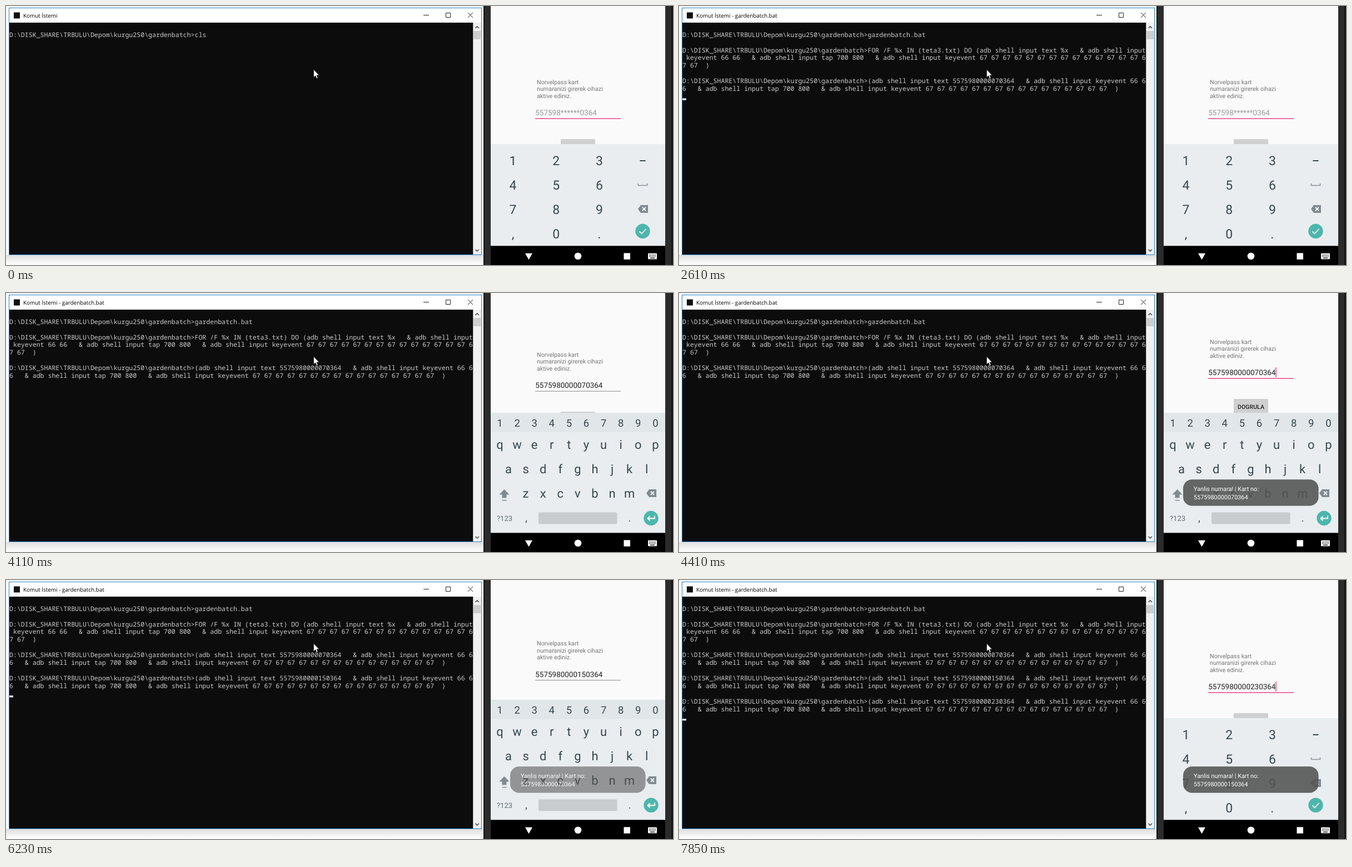
Recreate the animation shown at these times as an HTML page. Size 1200 by 467 pixels, loop 8000 ms.

```html
<!DOCTYPE html>
<html lang="tr">
<head>
<meta charset="utf-8">
<title>Komut</title>
<style>
  html, body { margin: 0; width: 100%; height: 100%; overflow: hidden; background: #fafafa; }
  svg { display: block; width: 100%; height: 100%; }
  text { font-family: Roboto, sans-serif; text-rendering: geometricPrecision; white-space: pre; }
  .console text { font: 11.583px "Noto Sans Mono", monospace; fill: #ccc; }
  .title { font: 9.9px "Open Sans", sans-serif; }
  .label { font-size: 10.75px; fill: #757575; }
  .field { font-size: 13.47px; }
  .toast { font-size: 10.85px; fill: #fff; }
  .keys { fill: #37474f; text-anchor: middle; }
  .line { fill: none; stroke: #222; stroke-width: 1; }
  .white { fill: none; stroke: #fff; stroke-width: 1.8; }
</style>
</head>
<body>
<svg viewBox="0 0 1200 467" preserveAspectRatio="none">
  <defs>
    <linearGradient id="shadow" x2="0" y2="1">
      <stop stop-color="#dedede"/><stop offset="1" stop-color="#fafafa"/>
    </linearGradient>
    <g id="erase">
      <path d="M-9 0L-4-7H9V7H-4Z" fill="#7f8b91"/>
      <path d="M-1-3.2L5 3.2M5-3.2L-1 3.2" class="white"/>
    </g>
  </defs>

  <!-- Console window -->
  <rect y="449" width="859" height="15" fill="url(#shadow)"/>
  <rect x="5.5" y="3.5" width="850" height="445" fill="#fff" stroke="#2a82c8"/>
  <rect x="14" y="11.5" width="11" height="11" fill="#111"/>
  <text id="title" class="title" x="31" y="20.8"></text>
  <path class="line" d="M751 16.5h10M791.5 12.5h8v8h-8zM831 12l9 9m0-9l-9 9"/>
  <rect x="6" y="30" width="834.5" height="418" fill="#0c0c0c"/>
  <rect x="840.5" y="30" width="14.5" height="418" fill="#f0f0f0"/>
  <rect x="841" y="45" width="13" height="15" fill="#cdcdcd"/>
  <path d="M844.5 40l3.2-3.2 3.2 3.2M844.5 439l3.2 3.2 3.2-3.2" fill="none" stroke="#444" stroke-width="1.5"/>
  <g id="console" class="console"></g>
  <rect id="caret" width="7" height="3.2" fill="#f2f2f2"/>
  <path d="M553.5 114.5v14.2l3.2-3 2.2 5 2.2-1-2.1-4.8h4.3z" fill="#fff" stroke="#111" stroke-width=".7"/>

  <!-- Phone -->
  <rect x="859" width="341" height="467" fill="#151515"/>
  <rect x="861" width="11" height="467" fill="#2b2b2b"/>
  <rect x="1186" width="11" height="467" fill="#2b2b2b"/>
  <rect x="872" width="314" height="433" fill="#fafafa"/>
  <g id="form">
    <g class="label">
      <text x="955" y="140.6">Norvelpass kart</text>
      <text x="955" y="153.2">numaranizi girerek cihazi</text>
      <text x="955" y="165.8">aktive ediniz.</text>
    </g>
    <text id="field" class="field" x="952.3" y="197"></text>
    <rect id="underline" x="952" width="154"/>
    <rect id="cursor" y="183" width="1.5" height="18" fill="#ff4081"/>
    <rect x="998" y="240" width="62" height="28" rx="1.5" fill="#d0d0d0"/>
    <text x="1029" y="257.6" font-size="10.6" font-weight="500" text-anchor="middle" fill="#222">DOGRULA</text>
  </g>
  <path id="handle" d="M0-9.5C2-7.5 8-5 8 0A8 8 0 0 1-8 0C-8-5-2-7.5 0-9.5Z" fill="#ff6399"/>
  <g id="numpad" class="keys" font-size="23"></g>
  <g id="qwerty" class="keys" font-size="22"></g>
  <g id="toast">
    <rect x="907" y="336.3" width="243.6" height="47.4" rx="16" fill="#525252" opacity=".88"/>
    <text class="toast" x="926" y="357.3">Yanlis numara! | Kart no:</text>
    <text id="wrong" class="toast" x="926" y="371.7"></text>
  </g>
  <rect x="872" y="432.5" width="314" height="34.5"/>
  <g fill="#fff">
    <path d="M934 446h13l-6.5 11.5zM1111.5 445.500h11.500v11.500h-11.500z"/>
    <circle cx="1029" cy="451" r="6.3"/>
    <rect x="1155" y="446" width="16" height="10.5" rx="1"/>
    <path d="M1157 449h12M1157 451.6h12" stroke="#000" stroke-width="1.3" stroke-dasharray="1.4 1.2"/>
    <path d="M1159 454.4h8" stroke="#000" stroke-width="1.2"/>
  </g>
</svg>

<script>
const LOOP = 8000, ROW = 13.95, COLS = 120, CHAR = 6.95, DIGIT = 7.56;
const $ = id => document.getElementById(id);
const set = (id, attrs) => Object.entries(attrs).forEach(([k, v]) => $(id).setAttribute(k, v));
const show = (id, on) => set(id, { visibility: on ? 'visible' : 'hidden' });
const step = (t, keys) => keys.findLast(([time]) => time <= t)[1];
const within = (t, spans) => spans.some(([from, to]) => t >= from && t < to);

// Keyboards
const key = (s, x, y, extra = '') => `<text x="${x}" y="${y}" ${extra}>${s}</text>`;
const keyRow = (s, x, y, gap, extra) => [...s].map((c, i) => key(c, x + i * gap, y, extra)).join('');
const board = y => `<rect x="872" y="${y}" width="314" height="${433 - y}" fill="#e9edf0"/>`;
const action = (x, icon) => `<circle cx="${x}" cy="406" r="13.2" fill="#4db6ac"/><path class="white" d="${icon}"/>`;

$('numpad').innerHTML = board(249)
  + ['123', '456', '789', ',0.'].map((s, i) => keyRow(s, 912, 287 + i * 44, 77.7)).join('')
  + '<rect x="1140.5" y="278" width="10" height="2"/>'
  + '<path d="M1137.5 320v3.5h16v-3.5" fill="none" stroke="#8a959a" stroke-width="1.6"/>'
  + '<use href="#erase" x="1146" y="366"/>'
  + action(1145.5, 'M1139.5 406.5l4 4 8-8.5');

$('qwerty').innerHTML = board(216)
  + '<rect x="872" y="216" width="314" height="35" fill="#e1e6e9"/>'
  + keyRow('1234567890', 888.5, 241.3, 31.1, 'font-size="18.5"')
  + ['qwertyuiop', 'asdfghjkl', 'zxcvbnm']
    .map((s, i) => keyRow(s, [888.5, 904, 935][i], 281 + i * 44, 31.1)).join('')
  + '<path d="M896.5 354l9 9.5h-5v6h-8v-6h-5zM892.5 373h8v1.5h-8z" fill="#7f8b91"/>'
  + '<use href="#erase" x="1161" y="361"/>'
  + key('?123', 897, 410.7, 'font-size="13" fill="#5f6c72"')
  + key(',', 936, 412, 'font-size="18"') + key('.', 1122, 412, 'font-size="18"')
  + '<rect x="958" y="395.5" width="141.5" height="21" rx="2" fill="#c8ccce"/>'
  + action(1160.5, 'M1167 401.5v5h-12.5m4-4l-4 4 4 4');

// Console text
const prompt = 'D:\\DISK_SHARE\\TRBULU\\Depom\\kurgu250\\gardenbatch>';
const batch = 'gardenbatch.bat';
const cards = ['07', '15', '23'].map(n => `5575980000${n}0364`);
const loopHead = 'FOR /F %x IN (teta3.txt) DO ';
const body = value => `(adb shell input text ${value}   & adb shell input keyevent 66 66`
  + `   & adb shell input tap 700 800   & adb shell input keyevent${' 67'.repeat(16)}  )`;
const recalled = loopHead + body('%x').replace(/ {3}&/g, ' &').replace('%x', '%x ').replace('  )', '');
const runs = [2610, 5090, 7290];

const rows = Array.from({ length: 16 }, (_, i) => {
  const row = document.createElementNS('http://www.w3.org/2000/svg', 'text');
  row.setAttribute('x', 6);
  row.setAttribute('y', 55.6 + i * ROW);
  return $('console').appendChild(row);
});

function drawConsole(t) {
  const started = runs.filter(time => t >= time).length;
  const typed = step(t, [[0, 'cls'], [580, batch], [850, recalled], [1120, batch]]);
  const lines = [];
  const print = (row, s) => {
    for (let i = 0; i < s.length; i += COLS) lines[row++] = s.slice(i, i + COLS);
  };
  print(0, prompt + typed);
  if (started) print(2, prompt + loopHead + body('%x'));
  cards.slice(0, started).forEach((card, i) => print(6 + i * 3, prompt + body(card)));
  rows.forEach((row, i) => {
    const s = lines[i] || '';
    if (row.textContent !== s) row.textContent = s;
  });
  $('title').textContent = 'Komut İstemi' + (started ? ' - ' + batch : '');

  const length = prompt.length + typed.length;
  const caretRow = started ? 5 + started * 3 : Math.floor(length / COLS);
  set('caret', { x: 6 + (started ? 0 : length % COLS) * CHAR, y: 54.9 + caretRow * ROW });
  show('caret', within(t, [[580, 1510], [2060, 3040], [3590, 4110], [4660, 5520], [6230, 6740], [7290, LOOP]]));
}

function drawPhone(t) {
  const shift = step(t, [[0, 0], [4110, -26], [4260, -49], [4535, -20], [4660, 0],
    [6230, -22.4], [6380, -49], [6740, -20], [6860, -2], [7010, 0]]);
  const count = step(t, [[0, 0], [3160, 3], [3310, 9], [3440, 16], [4810, 12], [4940, 6], [5090, 0],
    [5650, 11], [5800, 16], [7160, 7], [7290, 0], [7720, 10], [7850, 16]]);
  const card = step(t, [[0, cards[0]], [5090, cards[1]], [7290, cards[2]]]);
  const focused = !within(t, [[3990, 4260], [6230, 6380]]);
  const blinkOff = within(t, [[0, 150], [700, 1240], [1630, 2210], [2610, 3160]]);
  const letters = within(t, [[3990, 4535], [6230, 6740]]);

  set('form', { transform: `translate(0 ${shift})` });
  $('field').textContent = count ? card.slice(0, count) : '557598******0364';
  set('field', { fill: count ? '#212121' : '#9b9b9b' });
  set('underline', focused
    ? { y: 202.2, height: 1.7, fill: '#ec5f96' }
    : { y: 202.6, height: 1, fill: '#858585' });
  set('cursor', { x: 952.3 + count * DIGIT });
  show('cursor', focused && !blinkOff);
  show('numpad', !letters);
  show('qwerty', letters);

  const handleY = step(t, [[0, 0], [4660, 211], [4810, 0], [6860, 155.5], [7010, 211], [7160, 0]]);
  set('handle', { transform: `translate(1073.5 ${handleY})` });
  show('handle', handleY);

  $('wrong').textContent = cards[t < 6500 ? 0 : 1];
  set('toast', { opacity: step(t, [[0, 0], [4260, .7], [4410, 1], [6080, .92], [6230, .65],
    [6380, .15], [6500, .6], [6620, 1]]) });
}

function frame() {
  const t = performance.now() % LOOP;
  drawConsole(t);
  drawPhone(t);
  requestAnimationFrame(frame);
}
frame();
</script>
</body>
</html>
```
